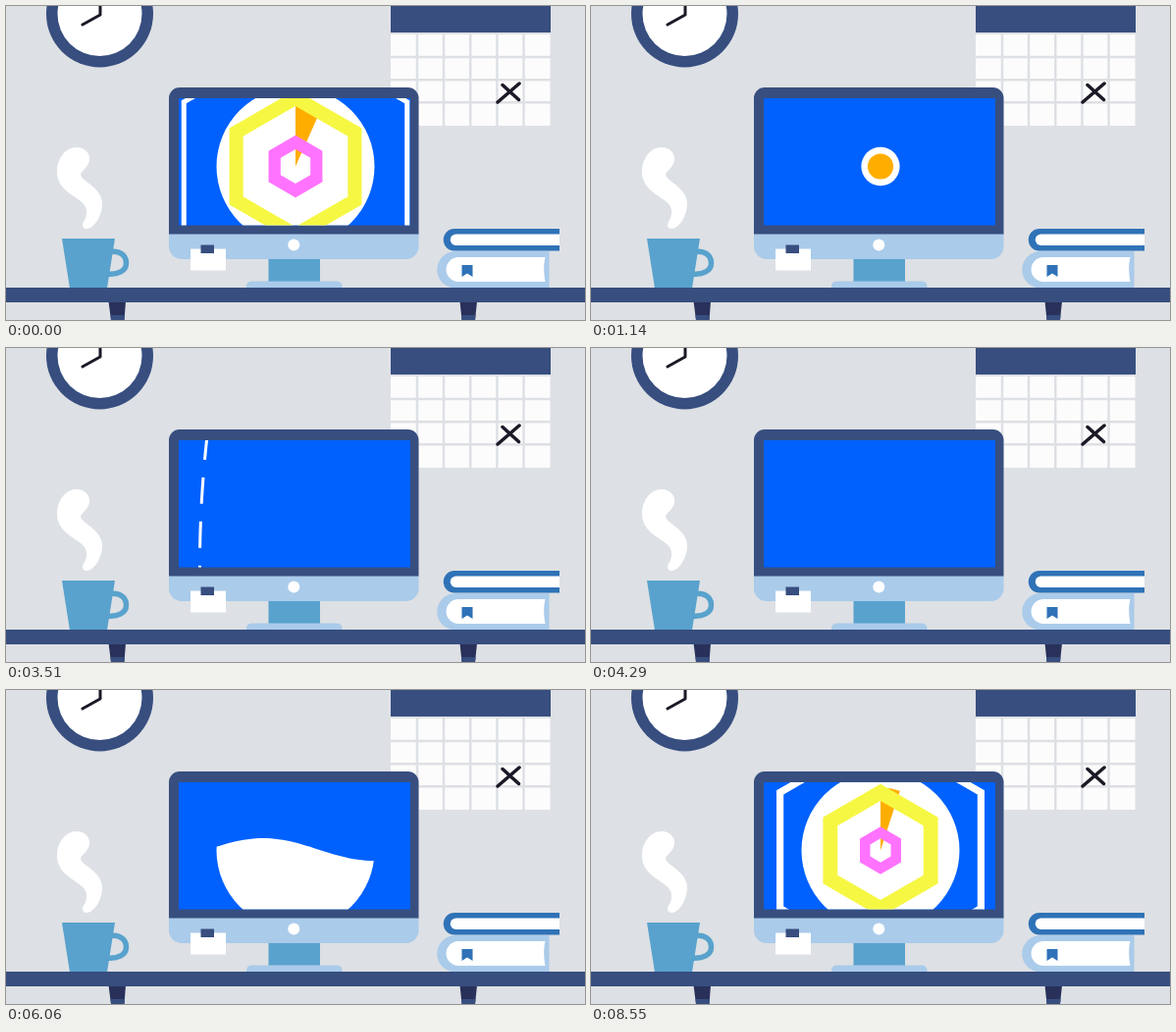
Recreate the animation shown at these times as an HTML page. Size 590 px wide and 320 px high, loop 8.58 s.

```html
<!DOCTYPE html>
<html lang="en">
<head>
<meta charset="utf-8">
<title>Desk</title>
<style>
html, body { margin: 0; width: 100%; height: 100%; overflow: hidden; background: #dde0e4; }
svg { display: block; width: 100vw; height: 100vh; }
.navy { fill: #374e7f; }
.dark { fill: #29315a; }
.pale { fill: #aacbea; }
.mid { fill: #58a2cd; }
.book { fill: #2f72b7; }
.white { fill: #fff; }
.ink { fill: none; stroke: #1b1926; stroke-linecap: round; stroke-linejoin: round; }
</style>
</head>
<body>
<svg viewBox="0 0 590 320">
  <defs>
    <clipPath id="screen"><rect x="176" y="94" width="236" height="129.5"/></clipPath>
    <clipPath id="bowl"><circle cx="295" cy="163.5" r="80.5"/></clipPath>
  </defs>
  <rect width="590" height="320" fill="#dde0e4"/>

  <circle class="navy" cx="95.5" cy="8" r="54.5"/>
  <circle class="white" cx="95.5" cy="8" r="43"/>
  <path class="ink" stroke-width="3" d="M96 -5V9L78 19"/>

  <rect class="navy" x="392" width="163" height="27"/>
  <rect x="392" y="29" width="162.5" height="93" fill="#fdfcfc"/>
  <path stroke="#dde0e4" stroke-width="2.5" d="M419 29v93m27 -93v93m27.200 -93v93m27.200 -93v93m27.100 -93v93M392 52h163M392 75.200h163M392 98.300h163"/>
  <path class="ink" stroke-width="3.500" d="M501 98L523 79M506 80.500L522.500 95.500"/>

  <path class="navy" d="M166 233V94a11 11 0 0 1 11 -11H409.500a11 11 0 0 1 11 11V233Z"/>
  <path class="pale" d="M166 232.500H420.500V245a13 13 0 0 1 -13 13H179a13 13 0 0 1 -13 -13Z"/>
  <circle class="white" cx="293.300" cy="243.500" r="6"/>
  <rect class="white" x="188" y="247.500" width="36" height="22"/>
  <rect class="navy" x="198.500" y="243.500" width="13.500" height="8.500"/>
  <rect class="mid" x="267.500" y="258" width="52.500" height="23"/>
  <path class="pale" d="M245 288V286q0 -5.500 6 -5.500H336.500q6 0 6 5.500V288Z"/>

  <path class="white" d="M72 144C80 144 86 150 85 157C84 165 77 167 76 172C78 180 99 185 98 203C97 216 89 227 82 227C78 227 77 223 79 220C83 214 83 207 80 203C74 194 52 189 52 169C52 156 60 144 72 144Z"/>
  <path class="mid" d="M57 237H111L103 287.500H65Z"/>
  <path d="M106 250.500C116 249 122.500 254 122.500 262C122.500 270 114 274 103 273" fill="none" stroke="#58a2cd" stroke-width="5.500"/>

  <path class="book" d="M564 227V249.500H457a11.250 11.250 0 0 1 0 -22.500Z"/>
  <path class="white" d="M564 232.500V244H458.500a5.750 5.750 0 0 1 0 -11.500Z"/>
  <path class="pale" d="M553.500 250V287.500H458a18.750 18.750 0 0 1 0 -37.500Z"/>
  <path class="white" d="M549.500 256C547.500 264 548 273 549.500 281H461a12.500 12.500 0 0 1 0 -25Z"/>
  <path class="book" d="M464.500 264H475.500V276L470 272.500L464.500 276Z"/>

  <path class="dark" d="M104.500 301H122L120.500 320H107ZM462.500 301H480L478 320H464.500Z"/>
  <path class="navy" d="M106.500 315H121L120.500 320H107ZM464 315H478.500L478 320H464.500Z"/>
  <rect class="navy" y="287" width="590" height="15"/>

  <g clip-path="url(#screen)">
    <rect x="176" y="94" width="236" height="130" fill="#0061ff"/>
    <path id="liquid" class="white" clip-path="url(#bowl)"/>
    <circle id="disc" class="white" cx="295" cy="163.500"/>
    <path id="pie" fill="#ffae00"/>
    <circle id="dot" fill="#ffae00" cx="295" cy="163.500"/>
    <path id="hexWhite" fill="#fff" fill-rule="evenodd"/>
    <path id="hexYellow" fill="#f6f743" fill-rule="evenodd"/>
    <path id="hexPink" fill="#ff73ff" fill-rule="evenodd"/>
    <path id="dashes" d="M205.300 87Q197.500 154.500 197.500 222V245" fill="none" stroke="#fff" stroke-width="3" stroke-dasharray="27 18"/>
  </g>
</svg>
<script>
const LOOP = 8580, STEP = 30, CX = 295, CY = 163.5;
const BOWL_R = 80.5, PIE_R = 64, WAVE = 225;
const el = id => document.getElementById(id);
const set = (id, name, value) => el(id).setAttribute(name, value);
const show = (id, on) => { el(id).style.display = on ? "" : "none"; };
const since = (t, start) => (t - start + LOOP) % LOOP;
const clamp = x => Math.max(0, Math.min(1, x));
const smooth = x => x * x * (3 - 2 * x);

// Eases in, then settles to a nearly constant speed.
const grow = age => {
  const n = age / STEP;
  return 0.773 * n * n / (1 + 0.0542 * n);
};

function polar(r, deg) {
  const a = deg * Math.PI / 180;
  return `${(CX + r * Math.sin(a)).toFixed(2)} ${(CY - r * Math.cos(a)).toFixed(2)}`;
}

function hexagon(apothem) {
  const r = apothem / Math.cos(Math.PI / 6);
  return "M" + [0, 60, 120, 180, 240, 300].map(a => polar(r, a)).join("L") + "Z";
}

function drawHex(id, t, start) {
  const age = since(t, start), on = age > 0 && age < 1000;
  show(id, on);
  if (!on) return;
  const r = grow(age);
  const hole = smooth(clamp((age / STEP + 8.8) / 29.5));
  set(id, "d", hexagon(r) + hexagon(r * hole));
}

function drawPie(t) {
  const deg = grow(since(t, 8385));
  const on = (t > 8385 || t < 900) && deg < 360;
  show("pie", on);
  if (on) set("pie", "d", `M${CX} ${CY}L${polar(PIE_R, 0)}A${PIE_R} ${PIE_R} 0 ${deg > 180 ? 1 : 0} 1 ${polar(PIE_R, deg)}Z`);
}

function drawDisc(t) {
  const full = t >= 7500 || t < 900;
  const p = clamp((t - 900) / 276);
  const r = full ? BOWL_R : t < 1176 ? BOWL_R * (1 - p * p) : 0;
  set("disc", "r", r);
  set("dot", "r", !full && r ? Math.max(0, PIE_R + (r - BOWL_R) * 51 / 61) : 0);
}

const levels = [[4590, 244], [5430, 173], [6060, 162.5], [7110, 105], [7500, 76]];
function levelAt(t) {
  const i = Math.max(1, levels.findIndex(p => p[0] >= t));
  const [t0, y0] = levels[i - 1], [t1, y1] = levels[i];
  return y0 + (y1 - y0) * (t - t0) / (t1 - t0);
}

function drawLiquid(t) {
  const on = t >= 4590 && t < 7500;
  show("liquid", on);
  if (!on) return;
  const level = levelAt(t);
  const crest = 262 + (t - 6060) * 88 / 1050;
  const height = Math.min(18, 11.5 * Math.exp((6060 - t) * 0.00085));
  let d = "M210 250";
  for (let x = 210; x <= 380; x += 4) {
    const y = level - height * Math.cos((x - crest) * 2 * Math.PI / WAVE);
    d += `L${x} ${y.toFixed(2)}`;
  }
  set("liquid", "d", d + "L380 250Z");
}

function drawDashes(t) {
  const on = t >= 1760 && t < 4250;
  show("dashes", on);
  if (on) set("dashes", "transform", `translate(${((t - 1760) % 830) * 0.3 - 27} 0)`);
}

function render(t) {
  drawDisc(t);
  drawLiquid(t);
  drawPie(t);
  drawHex("hexWhite", t, 8070);
  drawHex("hexYellow", t, 8220);
  drawHex("hexPink", t, 8370);
  drawDashes(t);
}

const begin = performance.now();
function tick() {
  const t = (performance.now() - begin) % LOOP;
  render(Math.floor(t / STEP) * STEP);
  requestAnimationFrame(tick);
}
tick();
</script>
</body>
</html>
```
